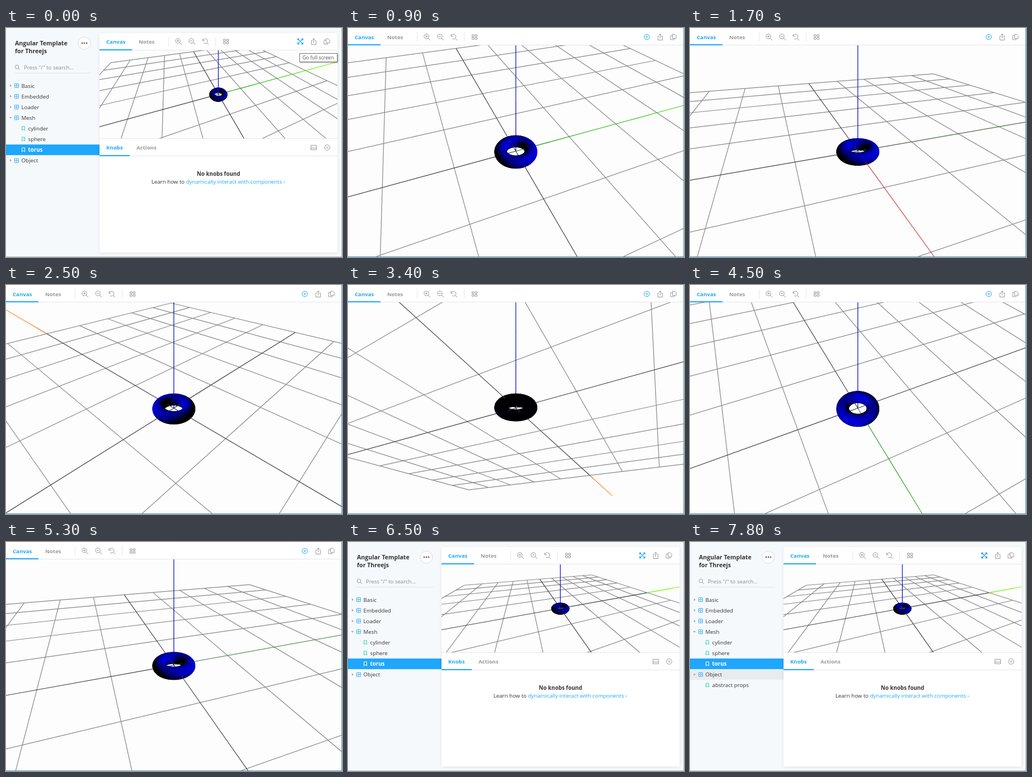
Write an HTML page with a canvas that moves like this. It is 600 px wide and 409 px high and loops after 8 s.

```html
<!DOCTYPE html>
<html lang="en">
<head>
<meta charset="utf-8">
<title>Component explorer</title>
<style>
html, body { margin: 0; width: 100%; height: 100%; overflow: hidden; background: #f6f9fc; }
#stage { position: absolute; left: 0; top: 0; width: 600px; height: 409px; overflow: hidden; background: #f6f9fc; }
svg { position: absolute; left: 0; top: 0; overflow: visible; }
text { font: 9.75px "Open Sans", "Noto Sans", sans-serif; fill: #333; }
.b { font-weight: 700; }
.tab { font-weight: 700; font-size: 9.6px; fill: #999; }
.on { fill: #1ea7fd; }
.i { fill: none; stroke: #999; stroke-width: 1; }
.blue { stroke: #1ea7fd; }
#main { position: absolute; overflow: hidden; background: #fff; box-shadow: 0 1px 5px rgba(0,0,0,.1); }
#view { position: absolute; left: 0; top: 31px; }
#panel { position: absolute; left: 0; width: 425px; height: 204px; background: #fff; }
#tip { position: absolute; left: 524px; top: 45px; width: 66px; height: 14px; background: #fff;
  border: 1px solid #777; box-shadow: 1px 1px 2px rgba(0,0,0,.35); }
#edge { position: absolute; inset: 0; border: solid; border-width: 0 1px 1px 0; }
</style>
</head>
<body>
<div id="stage">
  <svg id="side" width="600" height="409">
    <text class="b" x="16" y="30.5" style="font-size:10.6px">Angular Template</text>
    <text class="b" x="16" y="45" style="font-size:10.6px">for Threejs</text>
    <circle cx="140" cy="27" r="11" fill="#fff" stroke="#d9dee4"/>
    <g fill="#555"><circle cx="136" cy="27" r="1.3"/><circle cx="140" cy="27" r="1.3"/><circle cx="144" cy="27" r="1.3"/></g>
    <g class="i"><circle cx="19.5" cy="69.5" r="3.3"/><path d="M22 72l3 3"/></g>
    <text x="32" y="74" style="font-size:9.6px;fill:#888">Press "/" to search...</text>
    <path d="M16 80.5H152" stroke="#dde2e7"/>
    <g id="tree"></g>
  </svg>
  <div id="main">
    <canvas id="view" width="600" height="378"></canvas>
    <svg width="600" height="31">
      <rect width="600" height="31" fill="#fff"/>
      <path d="M0 30.5H600M123.5 7V24M207.5 7V24" stroke="#e3e6e9"/>
      <rect y="29" width="58" height="2" fill="#1ea7fd"/>
      <g id="bar">
        <text class="tab on" x="12" y="19.5">Canvas</text>
        <text class="tab" x="70" y="19.5">Notes</text>
        <g class="i">
          <g transform="translate(141 16)"><circle cx="-1" cy="-1" r="4.2"/><path d="M2 2l4 4M-3.2 -1h4.4M-1 -3.2v4.4"/></g>
          <g transform="translate(165 16)"><circle cx="-1" cy="-1" r="4.2"/><path d="M2 2l4 4M-3.2 -1h4.4"/></g>
          <g transform="translate(189 16)"><path d="M-5 -4.8v3.6h3.6M-4.7 -1.5A4.3 4.3 0 1 1 -3 3M2 2l4 4"/></g>
          <g transform="translate(226 16)"><path d="M-4.5 -4h3.5v3.2h-3.5zM1 -4h3.5v3.2h-3.5zM-4.5 1h3.5v3.2h-3.5zM1 1h3.5v3.2h-3.5z"/></g>
        </g>
        <g id="tools" class="i">
          <g id="expand" class="blue" transform="translate(-66.5 16)"><path d="M-4.5 -4.5l9 9M4.5 -4.5l-9 9M-4.7 -1.8v-2.9h2.9M4.7 -1.8v-2.9h-2.9M-4.7 1.8v2.9h2.9M4.7 1.8v2.9h-2.9" stroke-width="1.2"/></g>
          <g id="close" class="blue" transform="translate(-66.5 16)"><circle r="4.8"/><path d="M-2 -2l4 4M2 -2l-4 4"/></g>
          <g transform="translate(-42.5 16)"><path d="M-2 -1.5h-2.2v7h8.4v-7h-2.2M0 2.5v-8M-2.3 -3.2l2.3 -2.3l2.3 2.3"/></g>
          <g transform="translate(-19 16)"><path d="M-1.5 -4.8h4l2.5 2.5v5h-6.5zM-1.5 -2.3h-3.5v7.2h6.5v-2"/></g>
        </g>
      </g>
    </svg>
    <div id="panel">
      <svg width="425" height="204">
        <path d="M0 .5H425M0 31.5H425" stroke="#e3e6e9"/>
        <rect y="30" width="54" height="2" fill="#1ea7fd"/>
        <text class="tab on" x="12" y="20">Knobs</text>
        <text class="tab" x="66" y="20">Actions</text>
        <g class="i"><path d="M377.5 12.5h10v8h-10zM377.5 17.5h10"/><circle cx="406.5" cy="16.5" r="4.8"/><path d="M404.5 14.5l4 4M408.5 14.5l-4 4"/></g>
        <text class="b" x="212.5" y="67" text-anchor="middle">No knobs found</text>
        <text x="212" y="80.5" text-anchor="middle" style="font-size:9.7px">Learn how to <tspan class="on">dynamically interact with components ›</tspan></text>
      </svg>
    </div>
  </div>
  <div id="tip"><svg width="66" height="14"><text x="4.5" y="10.2" style="font-size:8.75px;fill:#555">Go full screen</text></svg></div>
  <div id="edge"></div>
</div>
<script>
const $ = id => document.getElementById(id);
const LOOP = 8000, STEP = 100;
const DIST = 15.25, HALF = 20.33, AXIS = 38.2, TAN = .4587;

// time, elevation, azimuth, strength of red and green axis over the grid
const keys = [
  [1300, 43.2, -21.7, 0, .9],
  [1700, 29.3, -19.5, .5, .15],
  [2500, 37.2, 134.1, 0, 0],
  [3400, -30.1, 208.9, 0, 0],
  [4500, 50.2, 64.9, 0, .9],
  [5300, 30.4, -19.6, 0, .35]
];

const mix = (a, b, k) => a + (b - a) * k;
const clamp = x => Math.max(0, Math.min(1, x));

function slope(k, c) {
  if (k === 0 || k === keys.length - 1) return 0;
  const [a, b, d] = [keys[k - 1], keys[k], keys[k + 1]];
  const m = (b[c] - a[c]) / (b[0] - a[0]), n = (d[c] - b[c]) / (d[0] - b[0]);
  return m * n <= 0 ? 0 : 2 * m * n / (m + n);
}

function track(t, c) {
  const last = keys.length - 1;
  if (t <= keys[0][0]) return keys[0][c];
  if (t >= keys[last][0]) return keys[last][c];
  let k = 0;
  while (t > keys[k + 1][0]) k++;
  const a = keys[k], b = keys[k + 1], h = b[0] - a[0], s = (t - a[0]) / h, r = 1 - s;
  return (1 + 2 * s) * r * r * a[c] + s * r * r * h * slope(k, c)
    + s * s * (3 - 2 * s) * b[c] - s * s * r * h * slope(k + 1, c);
}

const g = $('view').getContext('2d');
let cam;

function setCamera(elev, azim, w, h) {
  const e = elev * Math.PI / 180, a = azim * Math.PI / 180;
  cam = { se: Math.sin(e), ce: Math.cos(e), sa: Math.sin(a), ca: Math.cos(a),
    cx: w / 2 - .3, cy: h / 2, f: h / 2 / TAN };
}

function toEye([x, y, z]) {
  const toward = x * cam.ca + y * cam.sa;
  return [y * cam.ca - x * cam.sa, z * cam.ce - toward * cam.se, DIST - toward * cam.ce - z * cam.se];
}

const toScreen = ([x, y, d]) => [cam.cx + cam.f * x / d, cam.cy - cam.f * y / d];

function line(p, q, color, alpha = 1) {
  let a = toEye(p), b = toEye(q);
  const near = .3;
  if (a[2] < near && b[2] < near) return;
  const cut = (u, v) => {
    const k = (near - u[2]) / (v[2] - u[2]);
    return u.map((n, i) => mix(n, v[i], k));
  };
  if (a[2] < near) a = cut(a, b);
  if (b[2] < near) b = cut(b, a);
  g.globalAlpha = alpha;
  g.strokeStyle = color;
  g.lineWidth = 1.2;
  g.beginPath();
  g.moveTo(...toScreen(a));
  g.lineTo(...toScreen(b));
  g.stroke();
  g.globalAlpha = 1;
}

const onAxis = (axis, r) => [0, 1, 2].map(i => i === axis ? r : 0);

function axisLine(axis, from, to, alpha) {
  if (alpha < .02) return;
  const n = 10;
  for (let i = 0; i < n; i++) {
    const r = mix(from, to, i / n), s = mix(from, to, (i + 1) / n);
    const k = Math.round(153 * r / AXIS);
    const color = [`rgb(255,${k},0)`, `rgb(${k},${mix(150, 255, clamp(r / HALF))},0)`, `rgb(0,${k},215)`][axis];
    line(onAxis(axis, r), onAxis(axis, s), color, alpha);
  }
}

// one arm of a center line, blended with the axis lying on it
function arm(axis, sign, from, to, tint) {
  const share = sign > 0 ? tint[axis] : 0;
  line(onAxis(axis, sign * from), onAxis(axis, sign * to), '#444', 1 - share);
  axisLine(axis, from, to, share);
}

const torus = [];
for (let i = 0; i < 48; i++) for (let j = 0; j < 20; j++) {
  const at = (m, n, tube) => {
    const u = m / 48 * 2 * Math.PI, v = n / 20 * 2 * Math.PI, r = 1 + tube * Math.cos(v);
    return [r * Math.cos(u), r * Math.sin(u), tube * Math.sin(v)];
  };
  const c = at(i + .5, j + .5, .4), m = at(i + .5, j + .5, 0);
  const lit = (c[0] + c[1] + c[2] - m[0] - m[1] - m[2]) / .4 / Math.sqrt(3);
  torus.push({ c, glow: Math.max(0, lit) ** .8,
    pts: [at(i, j, .4), at(i + 1, j, .4), at(i + 1, j + 1, .4), at(i, j + 1, .4)] });
}

function drawQuads(list, power) {
  g.lineWidth = .5;
  for (const { q } of list) {
    g.fillStyle = g.strokeStyle = `rgb(0,0,${Math.round(power * q.glow)})`;
    g.beginPath();
    q.pts.forEach(p => g.lineTo(...toScreen(toEye(p))));
    g.closePath();
    g.fill();
    g.stroke();
  }
}

function drawScene(w, h, elev, azim, tint, power) {
  setCamera(elev, azim, w, h);
  g.fillStyle = '#fefdfe';
  g.fillRect(0, 0, 600, 378);
  for (let i = -5; i <= 5; i++) {
    if (!i) continue;
    const k = i * HALF / 5;
    line([k, -HALF, 0], [k, HALF, 0], '#888');
    line([-HALF, k, 0], [HALF, k, 0], '#888');
  }
  const arms = [[0, 1], [0, -1], [1, 1], [1, -1]];
  const isNear = ([axis, sign]) => toEye(onAxis(axis, sign))[2] < DIST;
  for (const a of arms) if (!isNear(a)) arm(...a, .6, HALF, tint);
  axisLine(0, HALF, AXIS, .85);
  axisLine(1, HALF, AXIS, 1);

  const sorted = torus.map(q => ({ q, d: toEye(q.c)[2] })).sort((a, b) => b.d - a.d);
  drawQuads(sorted.filter(o => o.d > DIST), power);
  for (const a of arms) arm(...a, 0, .6, tint);
  axisLine(2, 0, AXIS, 1);
  drawQuads(sorted.filter(o => o.d <= DIST), power);
  for (const a of arms) if (isNear(a)) arm(...a, 1.4, HALF, tint);
}

function drawTree(open, hover) {
  const rows = ['Basic', 'Embedded', 'Loader', 'Mesh', '-cylinder', '-sphere', '-torus', 'Object'];
  if (open) rows.push('-abstract props');
  $('tree').innerHTML = rows.map((row, i) => {
    const y = 103 + i * 19.1, leaf = row[0] === '-', name = row.replace('-', '');
    const picked = name === 'torus', down = name === 'Mesh' || (open && name === 'Object');
    const fill = picked ? '#1ea7fd' : hover && name === 'Object' ? '#e9ecef' : 'none';
    const back = `<rect y="${y - 9.5}" width="167" height="19" fill="${fill}"/>`;
    const icon = leaf
      ? `<path d="M28.5 ${y - 3.5}h5v7l-2.5 -2l-2.5 2z" fill="none" stroke="${picked ? '#fff' : '#37d5b3'}"/>`
      : `<path d="${down ? `M5.5 ${y - 1.2}h5l-2.5 3z` : `M7 ${y - 2.5}v5l3 -2.5z`}" fill="#aaa"/>
         <path d="M15.5 ${y - 3.5}h7v7h-7zM19 ${y - 3.5}v7M15.5 ${y}h7" fill="none" stroke="#45b4f5"/>`;
    const look = picked ? 'class="b" style="fill:#fff"' : '';
    return back + icon + `<text x="${leaf ? 39.5 : 27.5}" y="${y + 3.6}" ${look}>${name}</text>`;
  }).join('');
}

function render(t) {
  const full = clamp((t - 500) / 200) - clamp((t - 6300) / 200);
  const wide = mix(425, 600, full), high = mix(157, 378, full), late = t >= 6400;
  const box = $('main').style;
  box.left = mix(167, 0, full) + 'px';
  box.top = mix(9, 0, full) + 'px';
  box.width = wide + 'px';
  box.height = mix(392, 409, full) + 'px';
  box.borderRadius = mix(3, 0, full) + 'px';
  $('panel').style.top = 31 + high + 'px';
  $('bar').setAttribute('transform', `translate(0 ${full - 1})`);
  $('tools').setAttribute('transform', `translate(${wide} 0)`);
  $('expand').style.display = full === 1 ? 'none' : '';
  $('expand').style.stroke = t >= 7000 ? '#2796dc' : '';
  $('close').style.display = full === 1 ? '' : 'none';
  $('tip').style.display = t < 600 ? '' : 'none';
  $('edge').style.borderColor = full === 1 ? '#4d9fc4' : '#b4bac0';
  drawTree(t >= 7600, t >= 7300);
  const tint = late ? [0, 0] : [clamp(track(t, 3)), clamp(track(t, 4))];
  drawScene(wide, high, track(t, 1), track(t, 2), tint, mix(175, 225, full));
}

let shown = -1;
function tick() {
  const t = Math.floor(performance.now() % LOOP / STEP) * STEP;
  if (t !== shown) render(shown = t);
  requestAnimationFrame(tick);
}
tick();
</script>
</body>
</html>
```
